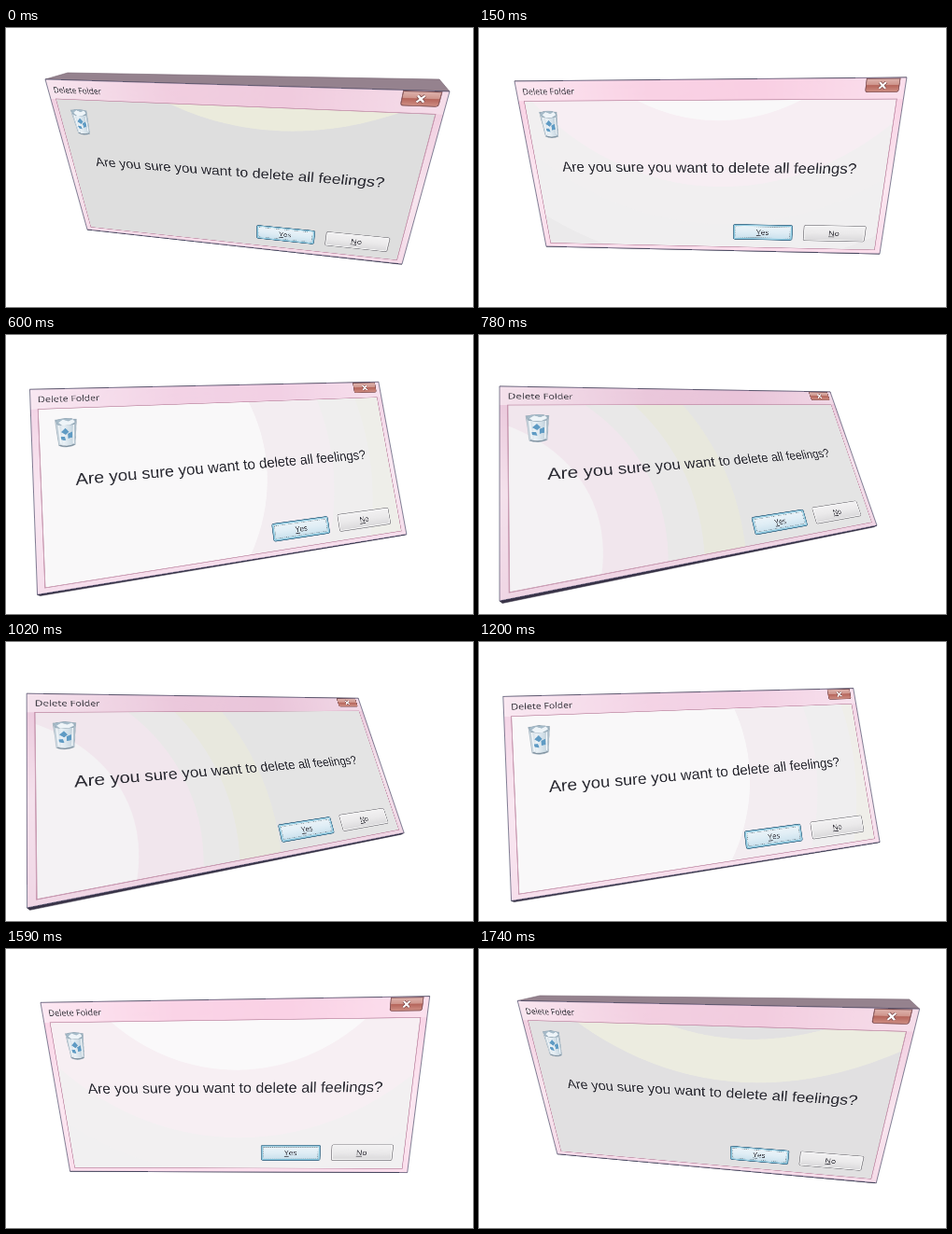
Recreate the animation shown at these times as an HTML page. Size 500 by 299 pixels, loop 1770 ms.

```html
<!DOCTYPE html>
<html lang="en">
<head>
<meta charset="utf-8">
<title>Delete Folder</title>
<style>
  html, body { margin: 0; width: 100%; height: 100%; overflow: hidden; background: #fff; }
  svg { position: absolute; left: 0; top: 0; }
  #stage, #rim { width: 500px; height: 299px; }
  #face { width: 800px; height: 400px; transform-origin: 0 0; }
  .ui { font: 9.1px "Open Sans", "Noto Sans", sans-serif; fill: #33323a; }
  .ask { font: 16.6px "Liberation Sans", Arial, sans-serif; fill: #2a2a32; }
  .key { text-decoration: underline; }
  .mid { text-anchor: middle; }
</style>
</head>
<body>
<svg id="stage" viewBox="0 0 500 299">
  <polygon id="top" fill="#95828e" stroke="#75626f" stroke-width=".6"/>
  <polygon id="bottom" fill="#3a3448" stroke="#2e2a3c" stroke-width=".5"/>
</svg>

<svg id="face" viewBox="0 0 400 200">
  <defs>
    <clipPath id="client"><rect x="6.5" y="21" width="387" height="174"/></clipPath>
    <linearGradient id="sheen">
      <stop offset="0" stop-color="#fff" stop-opacity=".5"/>
      <stop offset=".35" stop-color="#fff" stop-opacity=".05"/>
      <stop offset=".65" stop-color="#fff" stop-opacity="0"/>
      <stop offset="1" stop-color="#fff" stop-opacity=".35"/>
    </linearGradient>
    <linearGradient id="fade" x2="0" y2="1">
      <stop offset="0" stop-color="#fff" stop-opacity=".1"/>
      <stop offset=".5" stop-color="#fff" stop-opacity=".5"/>
      <stop offset="1" stop-color="#fff" stop-opacity=".3"/>
    </linearGradient>
    <linearGradient id="red" x2="0" y2="1">
      <stop offset="0" stop-color="#dfb4ae"/>
      <stop offset=".45" stop-color="#cf968d"/>
      <stop offset=".5" stop-color="#b4645a"/>
      <stop offset="1" stop-color="#cf8f84"/>
    </linearGradient>
    <linearGradient id="blue" x2="0" y2="1">
      <stop offset="0" stop-color="#eef5f9"/>
      <stop offset=".5" stop-color="#dfedf5"/>
      <stop offset="1" stop-color="#c6dfec"/>
    </linearGradient>
    <linearGradient id="grey" x2="0" y2="1">
      <stop offset="0" stop-color="#f3f2f3"/>
      <stop offset=".5" stop-color="#eae9ea"/>
      <stop offset="1" stop-color="#d8d7d9"/>
    </linearGradient>
    <linearGradient id="glass">
      <stop offset="0" stop-color="#bccad4"/>
      <stop offset=".35" stop-color="#eaf1f6"/>
      <stop offset=".7" stop-color="#cfdde6"/>
      <stop offset="1" stop-color="#a3b5c2"/>
    </linearGradient>
  </defs>

  <rect id="title" width="400" height="200"/>
  <rect width="400" height="21" fill="url(#sheen)"/>
  <rect y="21" width="400" height="179" fill="url(#fade)"/>
  <text class="ui" x="6.5" y="14.2">Delete Folder</text>

  <path d="M362 .8H394V11.5Q394 14 391.5 14H364.5Q362 14 362 11.5Z" fill="url(#red)" stroke="#7c4d50" stroke-width=".8"/>
  <path d="M375 4.500l6 6m0-6l-6 6" stroke="#7d4a4a" stroke-width="3.200"/>
  <path d="M375 4.500l6 6m0-6l-6 6" stroke="#fff" stroke-width="1.900"/>

  <g clip-path="url(#client)">
    <rect id="base" width="400" height="200"/>
    <g id="gloss">
      <circle id="yellow" r="277"/>
      <circle id="gap" r="232"/>
      <circle id="pink" r="196"/>
      <circle id="core" r="138"/>
    </g>
  </g>
  <rect x="6.5" y="21" width="387" height="174" fill="none" stroke="#c08ba5" stroke-width=".8"/>

  <g>
    <path d="M21 33H40.500L38 60Q30 63.500 23.500 60Z" fill="url(#glass)" stroke="#a7b6c1" stroke-width=".5"/>
    <path d="M21.500 33.500Q31 30 40 33.500L38.500 38Q31 40.500 23 38Z" fill="#a5bac8" stroke="#8fa2b0" stroke-width=".5"/>
    <path d="M24 36l4-3 5 2 4-2 2 3-5 3H27Z" fill="#eef4f8"/>
    <path d="M26 46l4-4 3 4-3 3ZM32 48l4-2 0 6-4 1ZM25 51l4 0 1 4-4-1Z" fill="#5f9bc4"/>
    <path d="M24 39l1.500 19M37.500 39L36.500 58" stroke="#f6fafc" fill="none"/>
    <path d="M24 59.500Q30 62.500 37.500 59.500" fill="none" stroke="#7f909e" stroke-width="1.200"/>
  </g>

  <text class="ask" x="36.800" y="101">Are you sure you want to delete all feelings?</text>

  <rect x="230.500" y="165" width="68" height="19.500" rx="2" fill="url(#blue)" stroke="#4a7691" stroke-width=".9"/>
  <rect x="231.700" y="166.200" width="65.600" height="17.100" rx="1.200" fill="none" stroke="#86c8e0" stroke-width="1.200"/>
  <rect x="233.200" y="167.800" width="62.600" height="13.900" fill="none" stroke="#5d6c76" stroke-width=".5" stroke-dasharray="1 1"/>
  <text class="ui mid" x="264.500" y="178">
    <tspan class="key">Y</tspan>es</text>

  <rect x="311.500" y="164.500" width="69" height="20" rx="2" fill="url(#grey)" stroke="#838186" stroke-width=".8"/>
  <rect x="312.600" y="165.600" width="66.800" height="17.800" rx="1.200" fill="none" stroke="#fafafa" stroke-width=".8"/>
  <text class="ui mid" x="345.700" y="177.700"><tspan class="key">N</tspan>o</text>
</svg>

<svg id="rim" viewBox="0 0 500 299">
  <polygon id="edge" fill="none" stroke="#2f3152" stroke-opacity=".75" stroke-width=".8"/>
</svg>

<script>
const LOOP = 1770, TURN = 897, STEP = 30;
const W = 800, H = 400;
const $ = id => document.getElementById(id);

// Swing positions at which the poses below are given.
const KEYS = [0, 0.167, 0.435, 0.87];

// Corner paths, clockwise from top left: x then y at each key.
const CORNERS = [
  [[42, 38, 31, 22], [55, 57, 59, 55]],
  [[475, 458, 427, 376], [68, 53, 45, 61]],
  [[424, 429, 431, 426], [253, 242, 226, 204]],
  [[87, 72, 50, 22], [216, 234, 261, 285]]
];

const COLORS = {
  title: ['f0cbde', 'f9cfe3', 'fddff0', 'e9c4d9'],
  base: ['dedede', 'ebeaeb', 'f6f5f6', 'e4e4e4'],
  yellow: ['ebebdc', 'f0eff0', 'f6f5f6', 'e8e8dd'],
  gap: ['dedede', 'f1eff0', 'f6f5f6', 'e9e8e8'],
  pink: ['e6e2e4', 'f7eef3', 'f6f5f6', 'f1e6ed'],
  core: ['f0f0f0', 'f9f8f9', 'fefefe', 'f4f2f4']
};

// Centre and scale of the reflected rings.
const GLOSS = { x: [250, 215, 150, -60], y: [-232, -137, 0, 165], s: [1, 1.3, 1.92, 1] };

// Smooth curve through the four key values.
const curve = (values, u) => values.reduce((sum, v, i) =>
  sum + KEYS.reduce((p, k, j) => j === i ? p : p * (u - k) / (KEYS[i] - k), v), 0);

// Straight pieces between the key values.
function linear(values, u) {
  const i = u < KEYS[1] ? 0 : u < KEYS[2] ? 1 : 2;
  const f = Math.min(1, (u - KEYS[i]) / (KEYS[i + 1] - KEYS[i]));
  return values[i] + (values[i + 1] - values[i]) * f;
}

function color(list, u) {
  const channel = n => Math.round(linear(list.map(h => parseInt(h.slice(n, n + 2), 16)), u));
  return `rgb(${channel(0)},${channel(2)},${channel(4)})`;
}

// Projective map of the flat dialog onto four corners.
function project([[x0, y0], [x1, y1], [x2, y2], [x3, y3]]) {
  const dx1 = x1 - x2, dx2 = x3 - x2, sx = x0 - x1 + x2 - x3;
  const dy1 = y1 - y2, dy2 = y3 - y2, sy = y0 - y1 + y2 - y3;
  const den = dx1 * dy2 - dx2 * dy1;
  const g = (sx * dy2 - dx2 * sy) / den, h = (dx1 * sy - sx * dy1) / den;
  const m = [
    (x1 - x0 + g * x1) / W, (y1 - y0 + g * y1) / W, 0, g / W,
    (x3 - x0 + h * x3) / H, (y3 - y0 + h * y3) / H, 0, h / H,
    0, 0, 1, 0,
    x0, y0, 0, 1
  ];
  return `matrix3d(${m.map(v => v.toFixed(9)).join()})`;
}

const shift = ([x, y], dx, dy) => [x + dx, y + dy];
const setPoints = (id, list) => $(id).setAttribute('points', list.join(' '));

function draw(time) {
  const t = Math.floor((time % LOOP) / STEP) * STEP;
  const u = t < TURN ? t / TURN : (LOOP - t) / (LOOP - TURN);

  const quad = CORNERS.map(([xs, ys]) => [curve(xs, u), curve(ys, u)]);
  const [tl, tr, br, bl] = quad;
  $('face').style.transform = project(quad);
  setPoints('edge', quad);

  // The box is thin; only its upper or lower side comes into view.
  setPoints('top', [tl, shift(tl, 24, -7 + 45 * u), shift(tr, -11, -13 + 80 * u), tr]);
  const drop = Math.max(0, u - 0.45);
  setPoints('bottom', [bl, shift(bl, 3, 6 * drop), shift(br, -3, 4 * drop), br]);

  for (const id in COLORS) $(id).setAttribute('fill', color(COLORS[id], u));
  const { x, y, s } = GLOSS;
  $('gloss').setAttribute('transform',
    `translate(${linear(x, u)} ${linear(y, u)}) scale(${linear(s, u)})`);
}

const start = performance.now();
function tick() {
  draw(performance.now() - start);
  requestAnimationFrame(tick);
}
tick();
</script>
</body>
</html>
```
